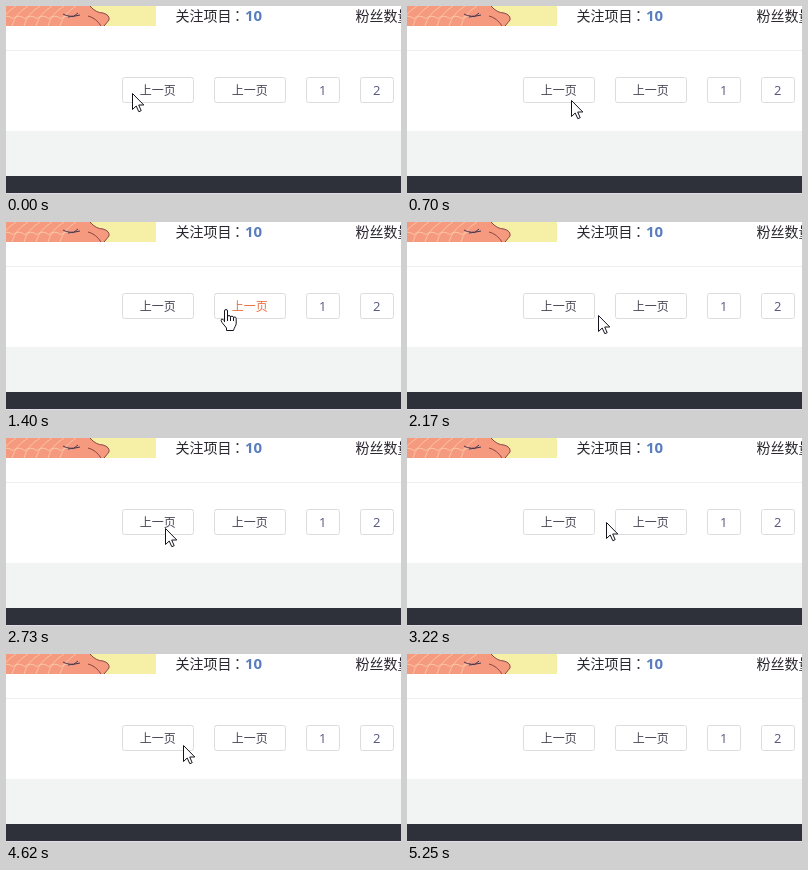
Write an HTML page that moves like this. It is 395 px wide and 188 px high and loops after 5530 ms.

```html
<!DOCTYPE html>
<html lang="zh-CN">
<head>
<meta charset="utf-8">
<title>分页按钮</title>
<style>
  html, body { margin: 0; width: 100%; height: 100%; overflow: hidden; background: #fff; }
  svg { display: block; width: 395px; height: 188px; }
  text { font-family: "Noto Sans CJK SC", "Noto Sans CJK", "Open Sans", sans-serif; }
  .info { font-size: 14px; fill: #2b2730; }
  .colon { font-family: "Noto Sans CJK JP", "Noto Sans CJK", sans-serif; }
  .count { font: bold 15px "Open Sans", "Noto Sans", sans-serif; fill: #5a7dbd; }
  .button rect { fill: #fff; stroke: #dcdcdc; }
  .button text { font-size: 12px; fill: #484856; text-anchor: middle; }
  .button .page { font: 13px "Open Sans", "Noto Sans", sans-serif; fill: #555580; }
  .button.hover text { fill: #e8703c; }
  .cursor path { fill: #fff; stroke: #14141e; stroke-linejoin: round; }
  .cursor .crease { fill: none; }
</style>
</head>
<body>
<svg viewBox="0 0 395 188">
  <!-- cropped illustration -->
  <svg width="150" height="20" fill="none">
    <rect width="150" height="20" fill="#f6f0a6"/>
    <path d="M0 0H84Q90 7 97 7 104 9 103 14L98 20H0Z" fill="#f59a7e"/>
    <g id="mesh" stroke="#fbcfae" stroke-width=".8"/>
    <path d="M84 0Q90 7 97 7 104 9 103 14L98 20M82 10Q90 12 95 20" stroke="#8c4447"/>
    <path d="M57 8Q63 12 74 9M62 11Q68 12 72 7" stroke="#473552"/>
  </svg>

  <text class="info" x="169.5" y="15">关注项目</text>
  <text class="info colon" lang="ja" x="224.5" y="15">：</text>
  <text class="count" x="239" y="15">10</text>
  <text class="info" x="349.5" y="15">粉丝数量</text>

  <rect y="44" width="395" height="1" fill="#eee"/>
  <g id="pager"></g>
  <rect y="125" width="395" height="45" fill="#f2f3f3"/>
  <rect y="170" width="395" height="17" fill="#2e313a"/>
  <rect y="187" width="395" height="1" fill="#dcdce2"/>

  <g class="cursor" id="cursor">
    <path id="arrow" d="M.5 .5V16.5L4.2 13 6.8 18.7 9.2 17.7 6.7 12H11.8Z"/>
    <g id="hand" transform="translate(-5)">
      <path d="M4.5 13V2q0-1.5 1.5-1.5T7.5 2V8q0-1.5 1.5-1.5t1.5 1.5v.5q0-1.3 1.5-1.3t1.5 1.5v.5q0-1.2 1.3-1.2t1.4 1.5V14q0 2-1 3.5T13.5 21.5H6.5V19L2 13.5Q.5 11 1.5 10.2 3 9.5 4.5 12Z"/>
      <path class="crease" d="M7.5 8v4M10.5 8.5v3.5M13.5 9v3"/>
    </g>
  </g>
</svg>
<script>
  const LOOP = 5530, TICK = 70, EXIT = 5250;
  const byId = id => document.getElementById(id);
  const cursor = byId('cursor'), arrow = byId('arrow'), hand = byId('hand');

  // Crossing curves on the illustration
  for (let x = -6; x < 56; x += 12) {
    byId('mesh').innerHTML += `<path d="M${x} 20q3-12 16-20M${x} 13q6-5 12-1"/>`;
  }

  // Buttons sit in a row with a 20px gap
  let left = 116;
  for (const label of ['上一页', '上一页', '1', '2']) {
    const isPage = label.length === 1, width = isPage ? 34 : 72;
    byId('pager').innerHTML += `<g class="button">
      <rect x="${left + .5}" y="71.5" width="${width - 1}" height="25" rx="2"/>
      <text class="${isPage ? 'page' : ''}" x="${left + width / 2 - .3}" y="89">${label}</text></g>`;
    left += width + 20;
  }
  const link = byId('pager').children[1];

  // Pointer glides: first change in ms, number of ticks, end point; it rests in between
  const origin = [126, 87];
  const glides = [
    [70, 3, 157, 91], [700, 5, 190, 104], [1120, 5, 219, 87], [1890, 5, 191, 93],
    [2310, 4, 158, 91], [2660, 3, 160, 90], [3080, 5, 225, 80], [3640, 9, 196, 85],
    [4340, 5, 177, 91], [4900, 6, 186, 190]
  ];

  function pointerAt(t) {
    let [x, y] = origin;
    for (const [start, ticks, toX, toY] of glides) {
      const k = Math.min(1, Math.max(0, ((t - start) / TICK + 1) / ticks));
      x += (toX - x) * k;
      y += (toY - y) * k;
    }
    return [Math.round(x), Math.round(y)];
  }

  function draw() {
    const t = Math.floor(performance.now() % LOOP / TICK) * TICK;
    const [x, y] = pointerAt(t);
    const over = x >= 208 && x < 280 && y >= 71 && y < 97;
    cursor.setAttribute('transform', `translate(${x} ${y})`);
    cursor.style.display = t < EXIT ? '' : 'none';
    arrow.style.display = over ? 'none' : '';
    hand.style.display = over ? '' : 'none';
    link.classList.toggle('hover', over);
    requestAnimationFrame(draw);
  }
  draw();
</script>
</body>
</html>
```
